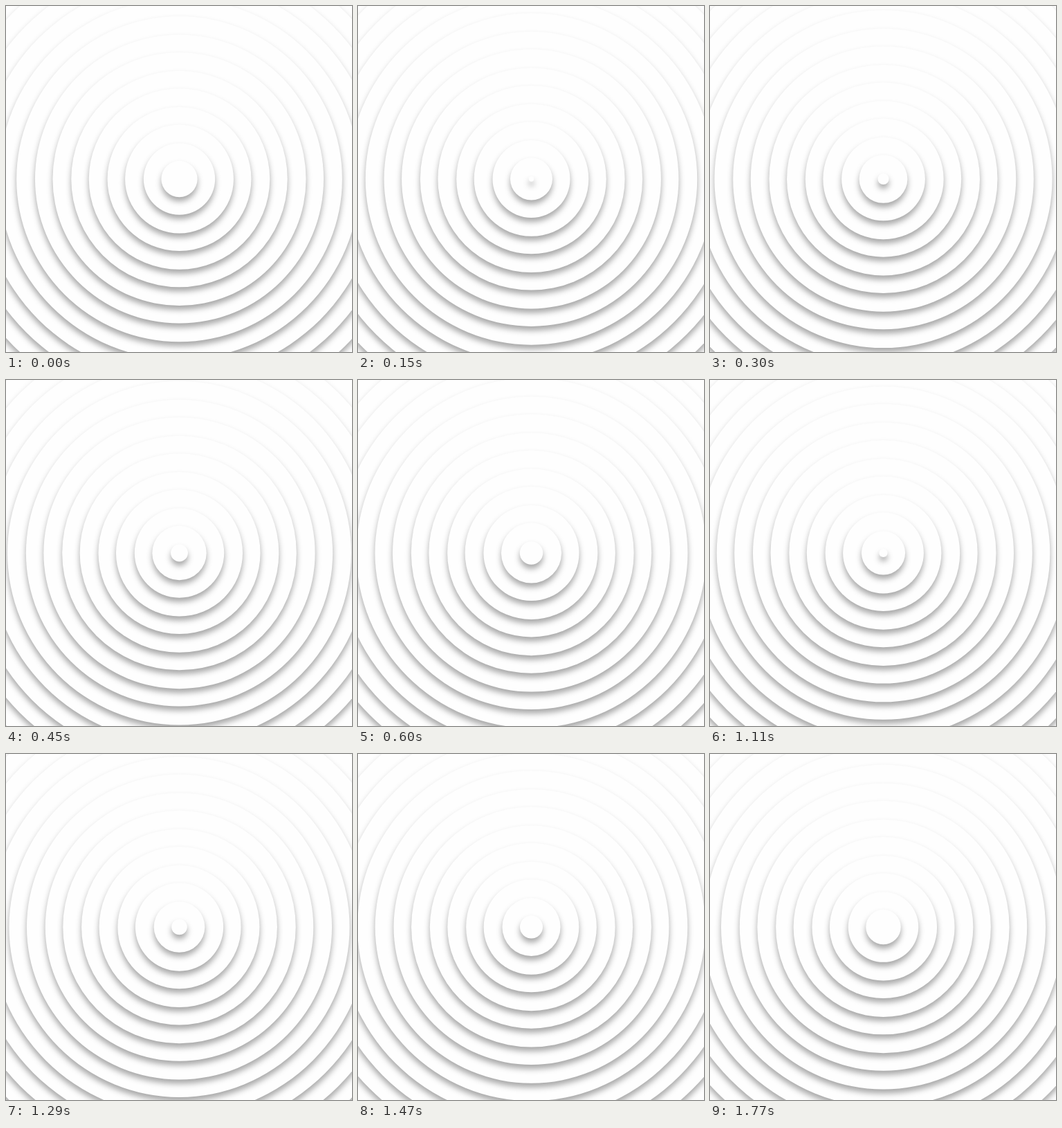
These frames come from a looping animation (500 px wide and 500 px high, 1.8 s). An HTML page with a canvas:

```html
<!DOCTYPE html>
<html lang="en">
<head>
<meta charset="utf-8">
<title>Rising discs</title>
<style>
  html, body { margin: 0; width: 100%; height: 100%; overflow: hidden; background: #fefefe; }
  canvas { display: block; }
</style>
</head>
<body>
<canvas id="stage" width="500" height="500"></canvas>
<script>
const ctx = document.getElementById('stage').getContext('2d');
const SPACING = 26.15, PERIOD = 900, STEP = 30, RINGS = 15;
const LAG = 0.025; // every other disc starts slightly late

ctx.fillStyle = '#fefefe';
ctx.shadowColor = 'rgba(0, 0, 0, 0.34)';
ctx.shadowOffsetY = 6;
ctx.shadowBlur = 8;

function disc(radius) {
  ctx.beginPath();
  ctx.arc(250.5, 250, radius, 0, Math.PI * 2);
  ctx.fill();
}

function draw(now) {
  const beat = Math.floor(now / STEP) * STEP / PERIOD;
  const newest = Math.floor(beat);
  // Oldest and largest first, so each disc casts its shadow on the one below.
  for (let born = newest - RINGS; born <= newest; born++) {
    const lag = born % 2 ? 0 : LAG;
    const radius = (beat - born - lag) * SPACING;
    if (radius > 0) disc(radius);
  }
}

const start = performance.now();
function tick() {
  draw(performance.now() - start);
  requestAnimationFrame(tick);
}
tick();
</script>
</body>
</html>
```
